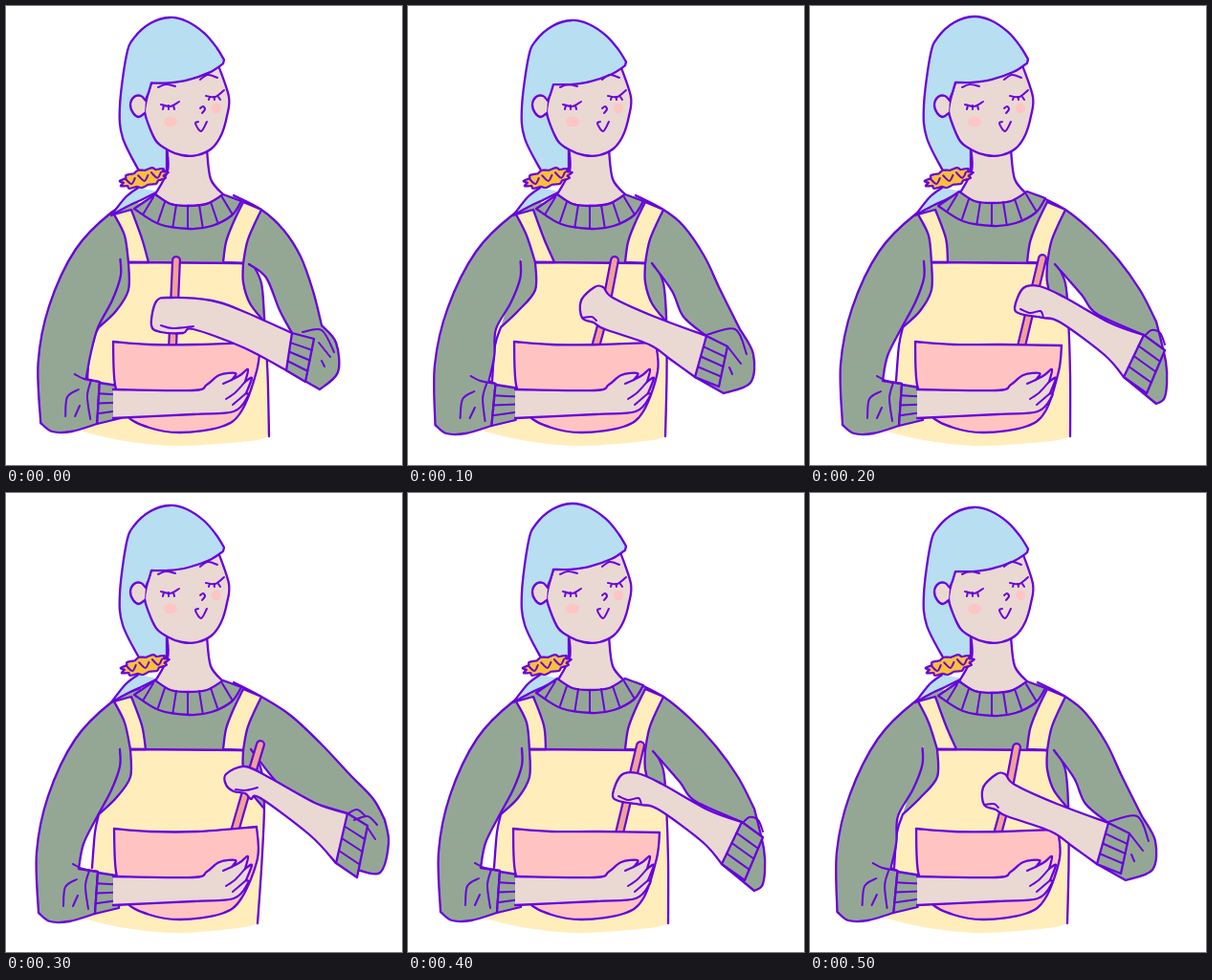
Recreate the animation shown at these times as an HTML page. Size 414 by 480 pixels, loop 600 ms.

```html
<!DOCTYPE html>
<html lang="en">
<head>
<meta charset="utf-8">
<title>Stirring</title>
<style>
html, body { margin: 0; width: 100%; height: 100%; overflow: hidden; background: #fff; }
svg { display: block; width: 100vw; height: 100vh; }
path { stroke-linecap: round; stroke-linejoin: round; }
</style>
</head>
<body>
<svg id="stage" viewBox="0 0 414 480"></svg>
<script>
const INK = '#6802dc', SKIN = '#ead8d3', HAIR = '#b8def2', KNIT = '#94a795',
      APRON = '#ffeebb', BOWL = '#ffc4c1', SPOON = '#efa294', GOLD = '#f8c136';
const stage = document.getElementById('stage');

function add(parent, tag, attrs) {
  const el = document.createElementNS('http://www.w3.org/2000/svg', tag);
  for (const k in attrs) el.setAttribute(k, attrs[k]);
  return parent.appendChild(el);
}

// Smooth curves through points: "|" makes a corner, "/" lifts the pen.
function curve(text) {
  return text.split('/').map(part => {
    let d = '', last = null;
    for (const run of part.split('|')) {
      const n = run.trim().split(/\s+/).map(Number), p = last ? [last] : [];
      for (let i = 0; i < n.length; i += 2) p.push([n[i], n[i + 1]]);
      if (!last) d = 'M' + p[0];
      for (let i = 0; i + 1 < p.length; i++) {
        const a = p[i - 1] || p[i], b = p[i], c = p[i + 1], e = p[i + 2] || c;
        const h = k => b[k] + (c[k] - a[k]) / 6, g = k => c[k] - (e[k] - b[k]) / 6;
        d += `C${h(0)},${h(1)} ${g(0)},${g(1)} ${c}`;
      }
      last = p[p.length - 1];
    }
    return d;
  }).join('');
}

const put = (to, pts, fill = 'none', width = 2.3, ink = INK) =>
  add(to, 'path', { d: curve(pts), fill, stroke: width ? ink : 'none', 'stroke-width': width });
const group = (to, transform) => add(to, 'g', { transform });

// Ribbed band between the edges a-d and b-c.
function cuff(to, a, b, c, d) {
  put(to, `${a} | ${b} | ${c} | ${d} | ${a}`, KNIT);
  const [A, B, C, D] = [a, b, c, d].map(s => s.split(' ').map(Number));
  const mix = (p, q, t) => p.map((v, k) => v + (q[k] - v) * t).join(' ');
  for (const t of [.26, .5, .75]) put(to, `${mix(A, D, t)} ${mix(B, C, t)}`, 'none', 2);
}

function drawBody(g, p) {
  put(g, `140 206 111 218 | 119 267 | 97 336 | 270 335 | 268 295 258 270 | 267 213 | 240 199`, KNIT, 0);
  const x = 128 + p.strap;
  const bib = `97 336 115 319 ${x} 297 ${x} 268 | 248 269 | 248 289 255 311 270 330`;
  put(g, `${bib} | ${p.hem} 450 | ${p.hem - 20} 455 180 460 125 455 80 445 | ${p.edge} 392`, APRON, 0);
  put(g, `258 270 267 290 270 325 ${p.hem * .5 + 136} 385 ${p.hem} 450`);
  put(g, `97 336 ${p.edge + 3} 355 ${p.edge} 392`);

  const arm = group(g, `matrix(1 0 ${p.lean / 200} 1 ${-215 * p.lean / 200} ${p.drop})`);
  put(arm, `140 203 110 218 72 257 44 316 32 375 34 438 | 46 447 66 447 93 439 | 96 395
    | ${p.inner} 392 | ${p.inner + 5} 366 95 338 110 310 119 285 119 267`, KNIT);

  const [a, , , d] = p.cuff;
  put(g, `238 198 267 213 ${p.outer} | ${d} | ${a} | ${p.under}`, KNIT);

  put(g, `113 218 124 240 ${x} 268 | ${p.strapEnd} 268 | 142 243 131 213 | 113 218`, APRON);
  put(g, '248 205 237 228 230 247 227 268 | 248 269 | 253 244 267 213 | 248 205', APRON);
  put(g, bib);
  return arm;
}

function drawHead(g, p) {
  put(g, '138 190 125 200 110 219 | 126 210 141 203 | 159 194', HAIR);
  put(g, '168 148 169 172 156 197 | 172 207 190 209 212 206 227 197 | 214 181 210 150', SKIN);

  const collar = group(g, `translate(0 ${p.collar})`);
  put(collar, `156 196 172 206 190 208 210 206 227 196 | 246 203
    | 236 218 215 229 192 232 160 227 134 211 | 156 196`, KNIT);
  for (let i = -3; i <= 3; i++) {
    const dy = i * i;
    put(collar, `${190 + 12 * i} ${208 - dy} ${190 + 15.5 * i} ${231 - 1.6 * dy}`, 'none', 2);
  }

  put(g, '152 80 145 112 156 140 168 150 184 156 200 156 215 149 225 135 231 115 233 95 222 62', SKIN);
  for (const [cx, cy, rx] of [[172, 121, 7], [220, 107, 5]])
    add(g, 'ellipse', { cx, cy, rx, ry: 5.2, fill: '#ffc4c4' });

  const k = (156 - p.top) / 143;
  put(group(g, `matrix(1 0 0 ${k} 0 ${156 * (1 - k)})`), `140 174 122 138 119 105 126 52 134 34 151 19 171 13
    189 17 207 29 220 44 228 57 | 227 61 | 213 70 190 78 170 81 152 81
    | 149 91 146 99 145 112 156 140 168 150 | 168 172 | 140 174`, HAIR);
  put(g, '146 99 141 94 134 95 130 103 133 112 139 116 145 112', SKIN);

  put(g, '162 103 172 105 181 100 / 209 94 219 95 228 88', 'none', 2);
  for (let i = 0; i < 3; i++)
    put(g, `${165 + 5 * i} 104 ${164 + 6 * i} 108 / ${213 + 4.5 * i} 95 ${212 + 6 * i} 98`, 'none', 2);
  put(g, '203 107 206 105 208 108 205 112 / 201 121 198 123 204 131 210 121', 'none', 2);
  put(g, '159 85 167 82 177 84 / 203 77 211 72 221 75', 'none', 2);

  // Scalloped hair tie
  const tie = group(g, `translate(${144 + p.tie} 180) rotate(-13)`), rim = [];
  for (let i = 0; i <= 44; i++) {
    const a = i / 44 * 2 * Math.PI, r = 1 + .1 * Math.cos(a * 11);
    rim.push(24 * r * Math.cos(a), 8.6 * r * Math.sin(a));
  }
  put(tie, rim.join(' '), GOLD, 2.2);
  for (const i of [-1, 0, 1])
    put(tie, `${14 * i - 5} -4 ${14 * i} 3 ${14 * i + 5} -2`, 'none', 2);
}

function drawFront(g, p, arm) {
  put(g, p.spoon, 'none', 10);
  put(g, p.spoon, 'none', 5.6, SPOON);

  const l = 112 + p.bowl;
  put(g, `${l} 351 150 354 200 354 ${p.lip} | ${l + 150} 382 246 424 225 440 182 446
    150 441 125 427 ${l + 2} 396 ${l} 351`, BOWL);
  put(g, `112 401 195 402 210 396 223 386 240 384 236 391 | 245 386 253 380 250 393
    | 257 389 251 405 | 253 408 238 424 196 427 112 431`, SKIN);
  put(g, '236 391 227 395 / 250 393 240 404 230 411 / 251 405 237 417', 'none', 2);
  cuff(arm, '96 396', '121 400', '118 433', '93 439');
  put(arm, '70 387 80 392 96 395 / 60 431 62 411 74 403 / 70 431 75 420 / 87 394 83 410 86 434', 'none', 2);

  const [a, , , d] = p.cuff;
  put(g, `${a} ${p.hand} ${d}`, SKIN);
  cuff(g, ...p.cuff);
  put(g, p.folds, 'none', 2);
}

const near = {
  top: 12, tie: 0, collar: 1, strap: 0, strapEnd: 149, hem: 275, edge: 85, inner: 82, lean: 2, drop: -2,
  bowl: 0, lip: '266 352', spoon: '174 358 178 266',
  cuff: ['299 342', '322 348', '313 393', '293 381'],
  outer: '290 234 308 262 321 298 330 334 | 345 352 347 383 328 401',
  under: '286 318 272 284 254 270',
  hand: '245 318 215 308 172 305 157 309 152 334 162 341 185 342 196 338 248 357',
  folds: '310 341 330 339 343 362 / 327 352 339 367 / 330 371 333 377 / 162 334 174 337 196 335'
};
const inward = {
  top: 15, tie: 2, collar: 1, strap: 5, strapEnd: 153, hem: 269, edge: 88, inner: 89, lean: -5, drop: 0,
  bowl: -1, lip: '259 352', spoon: '195 360 205 322 216 266',
  cuff: ['312 345', '334 356', '325 398', '300 388'],
  outer: '288 230 310 262 326 296 347 338 | 361 364 358 394 330 405',
  under: '288 325 276 298 255 269',
  hand: '258 325 214 305 204 294 195 294 181 308 182 326 194 331 206 338 252 354 275 370',
  folds: '312 344 342 338 354 364 / 334 356 348 374 / 336 378 339 385 / 182 326 192 325 197 329'
};
const outward = {
  top: 11, tie: 1, collar: -2, strap: -1, strapEnd: 144, hem: 272, edge: 90, inner: 76, lean: 0, drop: 0,
  bowl: -2, lip: '263 355', spoon: '220 360 230 318 243 264',
  cuff: ['349 344', '371 360', '352 405', '328 388'],
  outer: '295 236 322 265 345 297 362 330 | 372 372 373 396 370 411 362 416',
  under: '300 322 284 302 256 270',
  hand: '315 332 265 304 240 293 223 295 214 315 220 322 243 326 262 331 308 365',
  folds: '350 345 357 339 366 342 371 354 / 220 317 230 321 241 319 244 326'
};
const far = {
  top: 13, tie: 1, collar: 0, strap: 2, strapEnd: 146, hem: 263, edge: 90, inner: 76, lean: 0, drop: 1,
  bowl: 1, lip: '262 349', spoon: '237 361 250 316 266 263',
  cuff: ['357 335', '378 348', '367 402', '345 387'],
  outer: '298 233 330 263 360 295 384 320 396 342 | 400 366 391 397 367 394',
  under: '298 316 280 299 256 268',
  hand: '325 325 276 298 250 286 230 294 230 305 238 312 250 314 256 320 266 319 318 358',
  folds: '358 335 367 331 376 338 / 364 342 378 338 388 347 / 378 350 386 362 / 240 310 250 311 263 308'
};

// There and back: each drawing holds for one step.
const STEP = 100, order = [near, inward, outward, far, outward, inward];
for (const p of [near, inward, outward, far]) {
  const g = add(stage, 'g', { visibility: 'hidden' });
  const arm = drawBody(g, p);
  drawHead(g, p);
  drawFront(g, p, group(g, arm.getAttribute('transform')));
  const frames = [...order, near].map((pose, i) => ({
    visibility: pose === p ? 'visible' : 'hidden', offset: i / order.length, easing: 'step-end'
  }));
  g.animate(frames, { duration: STEP * order.length, iterations: Infinity });
}
</script>
</body>
</html>
```
